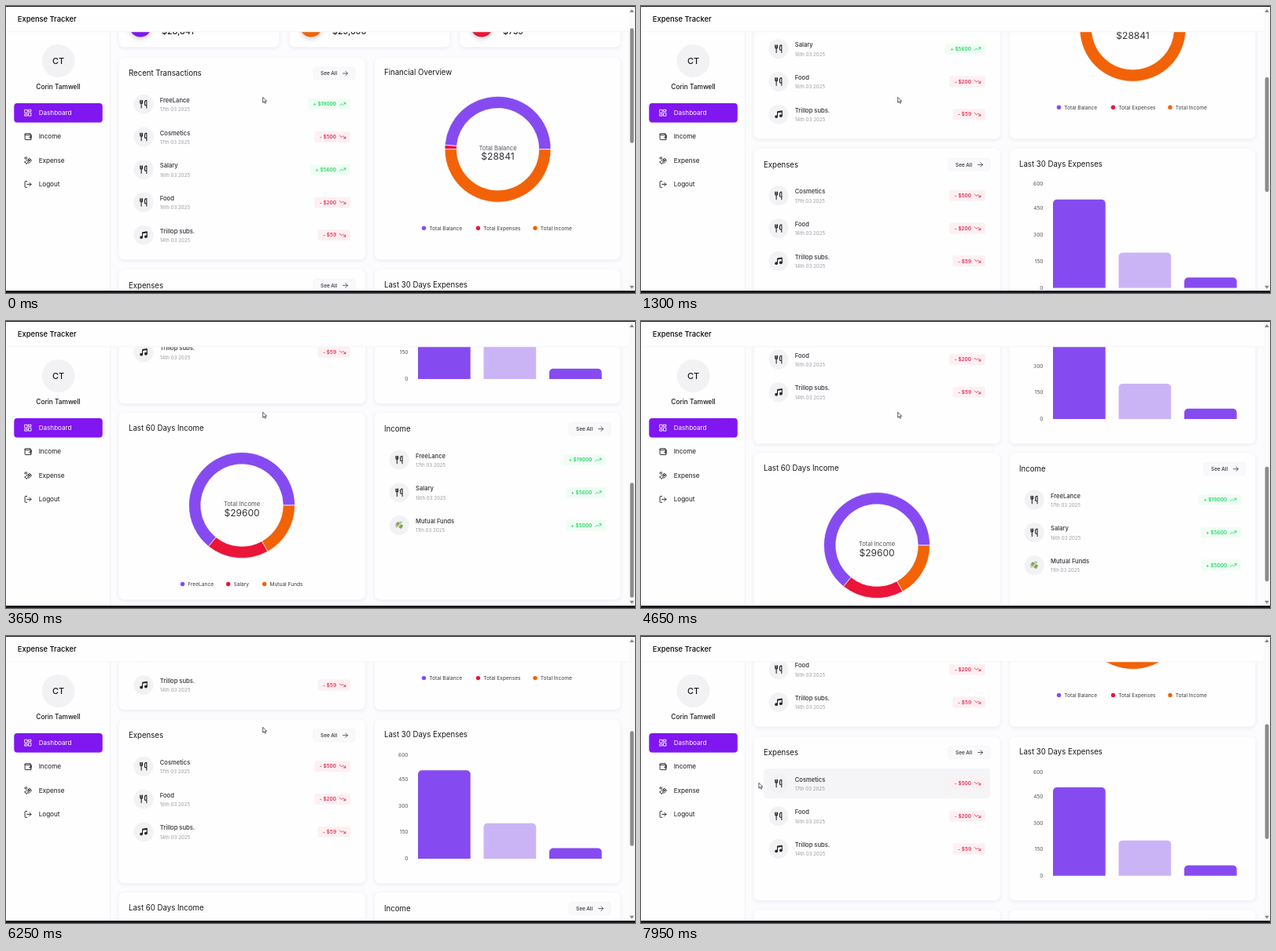
An HTML page with a canvas for the animation above (8000 ms loop, 800 by 366 pixels).

```html
<!DOCTYPE html>
<html lang="en">
<head>
<meta charset="utf-8">
<title>Expense Tracker</title>
<style>
  html, body { margin: 0; width: 100%; height: 100%; overflow: hidden; background: #fcfbfd; }
  canvas { display: block; width: 800px; height: 366px; }
</style>
</head>
<body>
<canvas id="stage"></canvas>
<script>
const W = 800, H = 366, LOOP = 8000, STEP = 50;
const canvas = document.getElementById('stage');
const ctx = canvas.getContext('2d');
const dpr = window.devicePixelRatio || 1;
canvas.width = W * dpr;
canvas.height = H * dpr;

const PURPLE = '#864bf0', RED = '#ea1538', ORANGE = '#f26207', GREEN = '#0ad655';
const INK = '#17171b', PALE = '#f2f2f4';

// Icons on a 24 x 24 grid
const ICONS = {
  dashboard: 'M3 3h7v9H3ZM14 3h7v5h-7ZM14 12h7v9h-7ZM3 16h7v5H3Z',
  wallet: 'M21 12V7H5a2 2 0 0 1 0-4h14v4M3 5v14a2 2 0 0 0 2 2h16V7M18 12a2 2 0 0 0 0 4h3v-4Z',
  coins: 'M11 15h2a2 2 0 1 0 0-4h-3c-.6 0-1.1.2-1.4.6L3 17M7 21l1.6-1.4c.3-.4.8-.6 1.4-.6h4c1.1 0 2.1-.4 2.8-1.2l4.6-4.4a2 2 0 0 0-2.75-2.91l-4.2 3.9M2 16l6 6M13.1 9a2.9 2.9 0 1 0 5.8 0a2.9 2.9 0 1 0-5.8 0M3 5a3 3 0 1 0 6 0a3 3 0 1 0-6 0',
  logout: 'M9 21H5a2 2 0 0 1-2-2V5a2 2 0 0 1 2-2h4M16 17l5-5-5-5M21 12H9',
  food: 'M3 2v6a3 3 0 0 0 6 0V2M6 2v20M20 15V2a5 5 0 0 0-5 5v6c0 1.1.9 2 2 2h3Zm0 0v7',
  music: 'M9 18V5l12-2v13M9 7l12-2',
  up: 'M22 7L13.5 15.5L8.5 10.5L2 17M16 7h6v6',
  down: 'M22 17L13.5 8.5L8.5 13.5L2 7M16 17h6v-6',
  arrow: 'M4 12h16M13 5l7 7-7 7'
};
for (const name in ICONS) ICONS[name] = new Path2D(ICONS[name]);

function icon(name, cx, cy, size, color, weight = 2) {
  ctx.save();
  ctx.translate(cx - size / 2, cy - size / 2);
  ctx.scale(size / 24, size / 24);
  ctx.strokeStyle = color;
  ctx.lineWidth = weight;
  ctx.lineCap = ctx.lineJoin = 'round';
  ctx.stroke(ICONS[name]);
  if (name === 'music') {
    disc(6, 18, 4, color);
    disc(18, 16, 4, color);
  }
  ctx.restore();
}

function disc(x, y, r, color) {
  ctx.fillStyle = color;
  ctx.beginPath();
  ctx.arc(x, y, r, 0, Math.PI * 2);
  ctx.fill();
}

function box(x, y, w, h, r, color, border) {
  ctx.beginPath();
  ctx.roundRect(x, y, w, h, r);
  ctx.fillStyle = color;
  ctx.fill();
  if (border) {
    ctx.strokeStyle = border;
    ctx.lineWidth = 0.6;
    ctx.stroke();
  }
}

function shadow(color, blur, dy, draw) {
  ctx.save();
  ctx.shadowColor = color;
  ctx.shadowBlur = blur * dpr;
  ctx.shadowOffsetY = dy * dpr;
  draw();
  ctx.restore();
}

// y is the optical middle of the line
function text(str, x, y, size, { color = INK, weight = 400, align = 'left' } = {}) {
  ctx.font = `${weight} ${size}px Inter, sans-serif`;
  ctx.fillStyle = color;
  ctx.textAlign = align;
  ctx.fillText(str, x, y + size * 0.35);
}

function card(x, y, w, h) {
  shadow('rgba(60,60,90,0.09)', 5, 1.5, () => box(x, y, w, h, 7, '#fefefe'));
}

function heading(str, x, y) {
  text(str, x, y, 9.65);
}

function seeAll(x, y) {
  box(x, y - 8, 53, 16, 3.5, '#f9f9fb', '#f0f0f3');
  text('See All', x + 9, y, 6.4, { color: '#2d2d33', weight: 500 });
  icon('arrow', x + 40.5, y, 9, '#2d2d33');
}

function cash(x, y) {
  ctx.save();
  ctx.translate(x, y);
  ctx.rotate(0.6);
  box(-4.5, -2.5, 9, 5, 0.8, '#7da35f');
  box(-1, -2.5, 2, 5, 0, '#e8d38a');
  ctx.restore();
  box(-0.5 + x, y - 5, 4.5, 2.4, 1.2, '#b9c3c6');
  box(x - 5, y - 1, 2.6, 4, 1.2, '#b9c3c6');
}

function chip(amount, right, y) {
  const gain = amount[0] === '+';
  const color = gain ? GREEN : '#e6143d';
  ctx.font = '500 6.5px Inter, sans-serif';
  const w = ctx.measureText(amount).width + 24.5;
  box(right - w, y - 7, w, 14, 2.5, gain ? '#f0fdf4' : '#fdf0f2');
  text(amount, right - 18, y, 6.5, { color, weight: 500, align: 'right' });
  icon(gain ? 'up' : 'down', right - 10, y, 9, color);
}

function entry([name, date, amount, kind], x, y, mouse) {
  const over = mouse && mouse.x > x - 10 && mouse.x < x + 282 && Math.abs(mouse.y - y) < 19;
  if (over) box(x - 6.5, y - 19, 288, 38, 4, '#f5f4f7');
  disc(x + 12.5, y, 12.5, PALE);
  if (kind === 'cash') cash(x + 12.5, y);
  else icon(kind, x + 12.5, y, 11.5, '#29292e', 2.3);
  text(name, x + 33.3, y - 5, 7.6, { color: '#2f2f36', weight: 500 });
  text(date, x + 33.3, y + 6.7, 6.2, { color: '#9b9ca4' });
  chip(amount, x + 275.5, y);
}

function entries(list, x, y, mouse) {
  list.forEach((item, i) => entry(item, x, y + i * 41.75, mouse));
}

function donut(cx, cy, parts, label, total) {
  const sum = parts.reduce((s, p) => s + p[0], 0);
  const R = 67.5, r = 52.3;
  let a = 0;
  for (const [value, color] of parts) {
    const b = a - value / sum * Math.PI * 2;
    ctx.beginPath();
    ctx.arc(cx, cy, R, a, b, true);
    ctx.arc(cx, cy, r, b, a);
    ctx.closePath();
    ctx.fillStyle = color;
    ctx.fill();
    ctx.strokeStyle = '#fff';
    ctx.lineWidth = 0.7;
    ctx.stroke();
    a = b;
  }
  text(label, cx, cy - 1.7, 7.6, { color: '#55555c', align: 'center' });
  text(total, cx, cy + 9.3, 12, { color: '#333338', align: 'center' });
}

function legend(items, y) {
  for (const [x, color, label] of items) {
    disc(x, y, 2.7, color);
    text(label, x + 6.8, y, 6.6, { color: '#3a3a42' });
  }
}

const LANCE = ['FreeLance', '17th 03 2025', '+ $19000', 'food'];
const COSMETICS = ['Cosmetics', '17th 03 2025', '- $500', 'food'];
const SALARY = ['Salary', '16th 03 2025', '+ $5600', 'food'];
const FOOD = ['Food', '16th 03 2025', '- $200', 'food'];
const SUBS = ['Trillop subs.', '14th 03 2025', '- $59', 'music'];
const FUNDS = ['Mutual Funds', '11th 03 2025', '+ $5000', 'cash'];

function barChart() {
  const zero = 513.5, unit = 0.2253;
  [[600, 381], [450, 412], [300, 446], [150, 479.5], [0, 513.3]].forEach(([v, y]) =>
    text(v, 511.5, y, 6.6, { color: '#55555c', align: 'right' }));
  [[524, 500, PURPLE], [607.5, 200, '#cbb4f6'], [691, 59, PURPLE]].forEach(([x, v, c]) =>
    box(x, zero - v * unit, 66.7, v * unit, [5, 5, 0, 0], c));
}

function page(mouse) {
  [[143.5, '#8017ee', '$28,841'], [360.5, ORANGE, '$29,600'], [577.5, RED, '$759']]
    .forEach(([x, color, sum]) => {
      card(x, -10, 204, 62.5);
      shadow('rgba(0,0,0,0.2)', 6, 2, () => disc(x + 27.5, 25.5, 14, color));
      text(sum, x + 54.5, 32, 10.7, { weight: 500 });
    });

  card(143.5, 66, 313.5, 257.5);
  heading('Recent Transactions', 156, 86);
  seeAll(391, 86);
  entries([LANCE, COSMETICS, SALARY, FOOD, SUBS], 162.5, 125.2, mouse);

  card(469, 66, 312.5, 257.5);
  heading('Financial Overview', 481, 85);
  donut(625.5, 182.7, [[28841, PURPLE], [759, RED], [29600, ORANGE]], 'Total Balance', '$28841');
  legend([[531.5, PURPLE, 'Total Balance'], [600.5, RED, 'Total Expenses'],
    [673, ORANGE, 'Total Income']], 283.2);

  card(143.5, 336, 313.5, 209);
  heading('Expenses', 156, 356.3);
  seeAll(391, 356.3);
  entries([COSMETICS, FOOD, SUBS], 162.5, 395.8, mouse);

  card(469, 336, 312.5, 209);
  heading('Last 30 Days Expenses', 481, 355.7);
  barChart();

  card(143.5, 556.8, 313.5, 238);
  heading('Last 60 Days Income', 156, 576.5);
  donut(300, 674.5, [[19000, PURPLE], [5600, RED], [5000, ORANGE]], 'Total Income', '$29600');
  legend([[224.5, PURPLE, 'FreeLance'], [282.7, RED, 'Salary'],
    [328.7, ORANGE, 'Mutual Funds']], 775);

  card(469, 556.8, 312.5, 238);
  heading('Income', 481, 577.2);
  seeAll(716, 577.2);
  entries([LANCE, SALARY, FUNDS], 487.7, 616.5, mouse);
}

function sidebar() {
  box(0, 33, 132, 330, 0, '#fefefe');
  box(132, 33, 0.8, 330, 0, '#f0eff2');
  disc(66.5, 70, 21, PALE);
  text('CT', 66.5, 70, 10.8, { weight: 500, align: 'center' });
  text('Corin Tamwell', 66.5, 103.5, 8.3, { weight: 500, align: 'center' });
  shadow('rgba(128,20,240,0.2)', 2, 0.5, () => box(10.3, 124, 112.4, 24.5, 4, '#8016f0'));
  [['dashboard', 'Dashboard'], ['wallet', 'Income'], ['coins', 'Expense'], ['logout', 'Logout']]
    .forEach(([glyph, label], i) => {
      const y = 136.2 + i * 30.4, color = i ? INK : '#fff';
      icon(glyph, 28, y, 10.5, color);
      text(label, 41.7, y, 8.1, { color });
    });
}

function triangle(x, y, dir) {
  ctx.fillStyle = '#858585';
  ctx.beginPath();
  ctx.moveTo(x - 2.8, y + 2 * dir);
  ctx.lineTo(x + 2.8, y + 2 * dir);
  ctx.lineTo(x, y - 2 * dir);
  ctx.fill();
}

function frameBars(scroll) {
  box(0, 0, 792, 33, 0, '#fefefe');
  box(0, 32.5, 792, 0.7, 0, '#f1f0f3');
  text('Expense Tracker', 14.8, 17, 9.35, { weight: 500, color: '#08080a' });
  box(792, 0, 8, H, 0, '#fafafa');
  triangle(796, 6, 1);
  triangle(796, 358.7, -1);
  box(793.7, 28.3 + scroll * 0.405, 4.8, 146.5, 2.4, '#8b8b8b');
  box(0, 0, W, 1, 0, '#1b1a1f');
  box(0, 363, W, 3, 0, '#1b1a1f');
}

function pointer({ x, y }) {
  ctx.save();
  ctx.translate(x, y);
  ctx.scale(0.43, 0.43);
  ctx.beginPath();
  [[0, 0], [0, 16], [3.7, 12.6], [6.3, 18.4], [9, 17.2], [6.5, 11.6], [11.5, 11.6]]
    .forEach(([px, py]) => ctx.lineTo(px, py));
  ctx.closePath();
  ctx.fillStyle = '#fff';
  ctx.fill();
  ctx.strokeStyle = '#25252a';
  ctx.lineWidth = 1.7;
  ctx.stroke();
  ctx.restore();
}

// Scroll keys: time, offset
const KEYS = [[0, 0], [1300, 154], [2250, 374], [2750, 439.5], [4000, 439.5],
  [5500, 283], [6800, 210], [7400, 207.8], [LOOP, 207.8]];
const slope = i => (KEYS[i + 1][1] - KEYS[i][1]) / (KEYS[i + 1][0] - KEYS[i][0]);

// Harmonic mean of neighbouring slopes keeps the curve free of overshoot
function tangent(i) {
  if (i === 0) return slope(0);
  if (i === KEYS.length - 1) return 0;
  const a = slope(i - 1), b = slope(i);
  return a * b > 0 ? 2 * a * b / (a + b) : 0;
}

function scrollAt(t) {
  let i = 0;
  while (i < KEYS.length - 2 && t >= KEYS[i + 1][0]) i++;
  const [t0, p0] = KEYS[i], [t1, p1] = KEYS[i + 1];
  const d = t1 - t0, u = (t - t0) / d, v = 1 - u;
  return v * v * (1 + 2 * u) * p0 + u * u * (3 - 2 * u) * p1
    + d * u * v * (v * tangent(i) - u * tangent(i + 1));
}

function mouseAt(t) {
  const u = Math.min(1, Math.max(0, (t - 6950) / 950));
  const e = u * u * (3 - 2 * u);
  return { x: 326.7 - 176.8 * e, y: 116.3 + 71 * e };
}

function draw(t) {
  const scroll = scrollAt(t), mouse = mouseAt(t);
  ctx.setTransform(dpr, 0, 0, dpr, 0, 0);
  box(0, 0, W, H, 0, '#fcfbfd');
  ctx.save();
  ctx.beginPath();
  ctx.rect(132, 33, 660, 330);
  ctx.clip();
  ctx.translate(0, -scroll);
  page(t > 6950 ? { x: mouse.x + 4, y: mouse.y + scroll } : null);
  ctx.restore();
  sidebar();
  frameBars(scroll);
  pointer(mouse);
}

function tick(now) {
  draw(Math.floor(now % LOOP / STEP) * STEP);
  requestAnimationFrame(tick);
}
draw(0);
requestAnimationFrame(tick);
</script>
</body>
</html>
```
